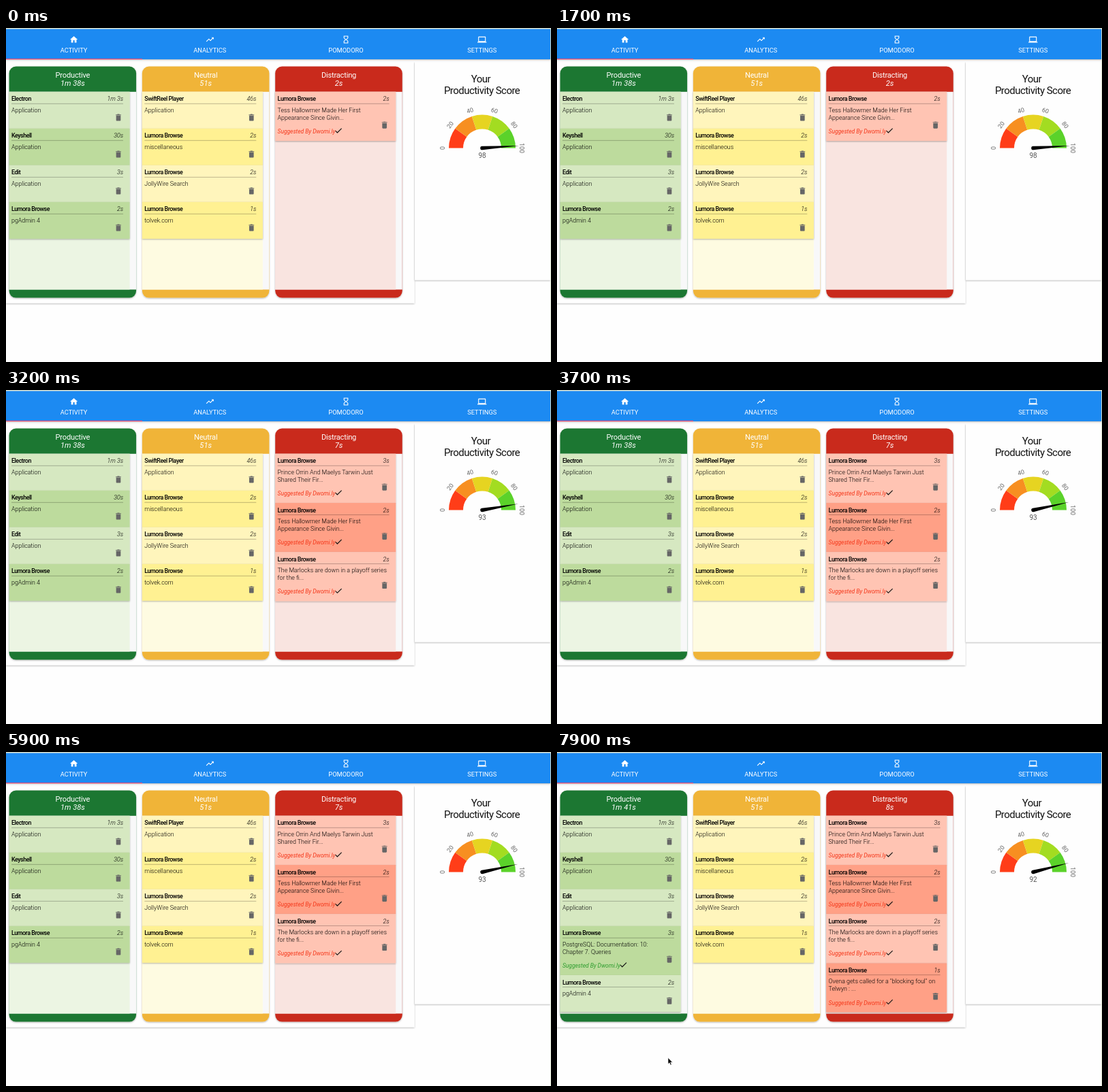
Animation, 800 px wide and 491 px high, one loop 8000 ms. Source, as an HTML page:

```html
<!DOCTYPE html>
<html lang="en">
<head>
<meta charset="utf-8">
<title>Productivity dashboard</title>
<style>
  html, body { margin: 0; width: 100%; height: 100%; overflow: hidden; background: #fefefe; }
  svg { display: block; width: 100%; height: 100%; font-family: Roboto, sans-serif; }
  .tab { font-size: 9.3px; fill: #fff; text-anchor: middle; }
  .head { font-size: 11.1px; letter-spacing: -.2px; fill: #fff; text-anchor: middle; }
  .total { font-size: 11.1px; font-style: italic; fill: #fff; text-anchor: middle; }
  .name { font-size: 8.9px; font-weight: 500; letter-spacing: -.46px; fill: #000; }
  .body { font-size: 8.85px; font-weight: 300; fill: #000; }
  .hint { font-size: 8.5px; font-style: italic; letter-spacing: -.05px; }
  .score { font-size: 15px; letter-spacing: -.53px; fill: #111; text-anchor: middle; }
  .mark { font-size: 8.9px; fill: #666; text-anchor: middle; }
  .value { font-size: 10px; fill: #555; text-anchor: middle; }
  .italic { font-style: italic; }
</style>
</head>
<body>
<svg id="stage" viewBox="0 0 800 491">
  <defs>
    <filter id="shadow" x="-5%" y="-5%" width="110%" height="115%">
      <feDropShadow dx="0" dy="1" stdDeviation="1" flood-opacity=".3"/>
    </filter>
  </defs>
  <g id="frame"></g>
  <g id="columns"></g>
  <g id="gauge"></g>
  <path id="needle" d="M0 -2.8 L54 0 L0 2.8 A2.8 2.8 0 0 1 0 -2.8Z"/>
  <text id="value" class="value" x="699" y="191"></text>
  <path id="cursor" d="M163 449.5v9.2l2.1-1.9 1.5 3.4 1.6-.7-1.5-3.3h2.9z" fill="#000" stroke="#fff" stroke-width=".6"/>
</svg>
<script>
const LOOP = 8000, EASE = 300, CURSOR_AT = 7600;
const PIVOT = 'translate(699 176.5)';
const BROWSER = 'Lumora Browse', APP = 'Application';
const $ = id => document.getElementById(id);

const ICONS = {
  home: 'M10 20v-6h4v6h5v-8h3L12 3 2 12h3v8z',
  trend: 'M16 6l2.29 2.29-4.88 4.88-4-4L2 16.59 3.41 18l6-6 4 4 6.3-6.29L22 12V6z',
  hourglass: 'M6 2v6l4 4-4 4v6h12v-6l-4-4 4-4V2H6zm10 14.5V20H8v-3.5l4-4 4 4zm-4-5l-4-4V4h8v3.5l-4 4z',
  laptop: 'M20 18c1.1 0 2-.9 2-2V6c0-1.1-.9-2-2-2H4c-1.1 0-2 .9-2 2v10c0 1.1.9 2 2 2H0v2h24v-2h-4zM4 6h16v10H4V6z',
  trash: 'M6 19c0 1.1.9 2 2 2h8c1.1 0 2-.9 2-2V7H6v12zM19 4h-3.5l-1-1h-5l-1 1H5v2h14V4z',
  check: 'M9 16.17L4.83 12l-1.42 1.41L9 19 21 7l-1.41-1.41z'
};

const rect = (x, y, w, h, fill, extra = '') =>
  `<rect x="${x}" y="${y}" width="${w}" height="${h}" fill="${fill}" ${extra}/>`;
const text = (x, y, cls, str, extra = '') =>
  `<text x="${x}" y="${y}" class="${cls}" ${extra}>${str}</text>`;
const icon = (name, cx, cy, fill) =>
  `<path d="${ICONS[name]}" fill="${fill}" transform="translate(${cx} ${cy}) scale(.555) translate(-12 -12)"/>`;

const item = (name, time, ...lines) => ({ name, time, lines });
const page = (time, ...lines) => ({ name: BROWSER, time, lines, hint: true });

const apps = [item('Electron', '1m 3s', APP), item('Keyshell', '30s', APP), item('Edit', '3s', APP)];
const admin = item(BROWSER, '2s', 'pgAdmin 4');
const docs = page('3s', 'PostgreSQL: Documentation: 10:', 'Chapter 7. Queries');
const neutral = [
  item('SwiftReel Player', '46s', APP), item(BROWSER, '2s', 'miscellaneous'),
  item(BROWSER, '2s', 'JollyWire Search'), item(BROWSER, '1s', 'tolvek.com')
];
const debut = page('2s', 'Tess Hallowmer Made Her First', 'Appearance Since Givin...');
const royals = page('3s', 'Prince Orrin And Maelys Tarwin Just', 'Shared Their Fir...');
const playoff = page('2s', 'The Marlocks are down in a playoff series', 'for the fi...');
const foul = page('1s', 'Ovena gets called for a "blocking foul" on', 'Telwyn : ...');

const before = ['1m 38s', [...apps, admin]], after = ['1m 41s', [...apps, docs, admin]];
const states = [
  { at: 0, score: 98, good: before, bad: ['2s', [debut]] },
  { at: 1900, score: 95, good: before, bad: ['5s', [royals, debut]] },
  { at: 3100, score: 93, good: before, bad: ['7s', [royals, debut, playoff]] },
  { at: 6500, score: 93, good: after, bad: ['7s', [royals, debut, playoff]] },
  { at: 7500, score: 92, good: after, bad: ['8s', [royals, debut, playoff, foul]] }
];

const themes = [
  { title: 'Productive', main: '#1f7733', tint: '#ecf5e3', cards: ['#d6e8c1', '#bddb9d'], hint: '#2f9e2f' },
  { title: 'Neutral', main: '#f0b437', tint: '#fefbe1', cards: ['#fff5bc', '#fff192'], hint: '#b08a20' },
  { title: 'Distracting', main: '#c92c1e', tint: '#f9e4e0', cards: ['#ffc4b3', '#ffa086'], hint: '#f5391c' }
];

function card(entry, y, fill, hintColor) {
  const h = entry.hint ? 72.2 : 54;
  let out = rect(0, y, 177, h, fill, 'filter="url(#shadow)"')
    + text(3.4, y + 13.6, 'name', entry.name)
    + text(167.5, y + 13.6, 'body italic', entry.time, 'text-anchor="end"')
    + rect(3.4, y + 17.1, 164, .6, '#000', 'opacity=".42"')
    + entry.lines.map((line, i) => text(3.4, y + 30 + 11 * i, 'body', line)).join('')
    + icon('trash', 160.4, y + (entry.hint ? 48.9 : 37.8), '#666');
  if (entry.hint) {
    out += text(3.4, y + 61.2, 'hint', 'Suggested By Dwomi.ly', `fill="${hintColor}"`)
      + icon('check', 92.8, y + 57, '#111');
  }
  return { out, h };
}

function column(theme, index, [total, entries]) {
  let y = 93.8, cards = '';
  entries.forEach((entry, i) => {
    const { out, h } = card(entry, y, theme.cards[i % 2], theme.hint);
    cards += out;
    y += h;
  });
  return `<g transform="translate(${4.6 + 195.3 * index} 0)">`
    + rect(0, 56.6, 186.5, 340, theme.main, 'rx="10" filter="url(#shadow)"')
    + rect(0, 93.8, 186.5, 290.7, '#f8f8f9') + rect(0, 93.8, 177, 290.7, theme.tint)
    + cards
    + text(93.3, 73.2, 'head', theme.title) + text(93.3, 85.2, 'total', total) + '</g>';
}

function drawFrame() {
  const tabs = [['home', 'ACTIVITY'], ['trend', 'ANALYTICS'], ['hourglass', 'POMODORO'], ['laptop', 'SETTINGS']];
  $('frame').innerHTML = rect(0, 50, 599.5, 354.5, '#fefefe', 'filter="url(#shadow)"')
    + rect(600, 50, 199, 320.5, '#fefefe', 'filter="url(#shadow)"')
    + rect(0, 0, 800, 1.5, '#e2e8cf') + rect(799, 0, 1, 491, '#dfe6d2')
    + rect(0, 1.5, 799, 44.5, '#1f8af2', 'filter="url(#shadow)"')
    + rect(0, 45, 200, 1.2, '#ea4a78')
    + tabs.map(([name, label], i) => {
      const x = 99.6 + 199.7 * i;
      return icon(name, x, 17, '#fff') + text(x, 36.3, 'tab', label);
    }).join('');
}

function drawGauge() {
  const point = (r, part) => {
    const a = Math.PI * (1 - part);
    return `${r * Math.cos(a)} ${-r * Math.sin(a)}`;
  };
  const arcs = ['#ff3d18', '#f78f21', '#e6d421', '#a3dc21', '#5bd22a'].map((fill, i) => {
    const a = i / 5, b = (i + 1) / 5;
    return `<path fill="${fill}" d="M${point(49, a)} A49 49 0 0 1 ${point(49, b)}`
      + ` L${point(28, b)} A28 28 0 0 0 ${point(28, a)}Z"/>`;
  }).join('');
  const marks = [0, 20, 40, 60, 80, 100].map(n =>
    text(0, -55, 'mark', n, `transform="rotate(${n * 1.8 - 90})"`)).join('');
  $('gauge').innerHTML = text(697, 80, 'score', 'Your') + text(698.6, 97.3, 'score', 'Productivity Score')
    + `<g transform="${PIVOT}">${arcs}${marks}</g>`;
}

let shown = -1;
function render(t) {
  const index = states.findLastIndex(s => t >= s.at);
  const state = states[index], previous = states[Math.max(0, index - 1)];
  if (index !== shown) {
    shown = index;
    const data = [state.good, ['51s', neutral], state.bad];
    $('columns').innerHTML = themes.map((theme, i) => column(theme, i, data[i])).join('');
    $('value').textContent = state.score;
  }
  const p = Math.min(1, (t - state.at) / EASE), eased = p * p * (3 - 2 * p);
  const score = previous.score + (state.score - previous.score) * eased;
  $('needle').setAttribute('transform', `${PIVOT} rotate(${score * 1.8 - 180})`);
  $('cursor').style.display = t >= CURSOR_AT ? '' : 'none';
}

drawFrame();
drawGauge();
const start = performance.now();
function tick() {
  render((performance.now() - start) % LOOP);
  requestAnimationFrame(tick);
}
tick();
</script>
</body>
</html>
```
